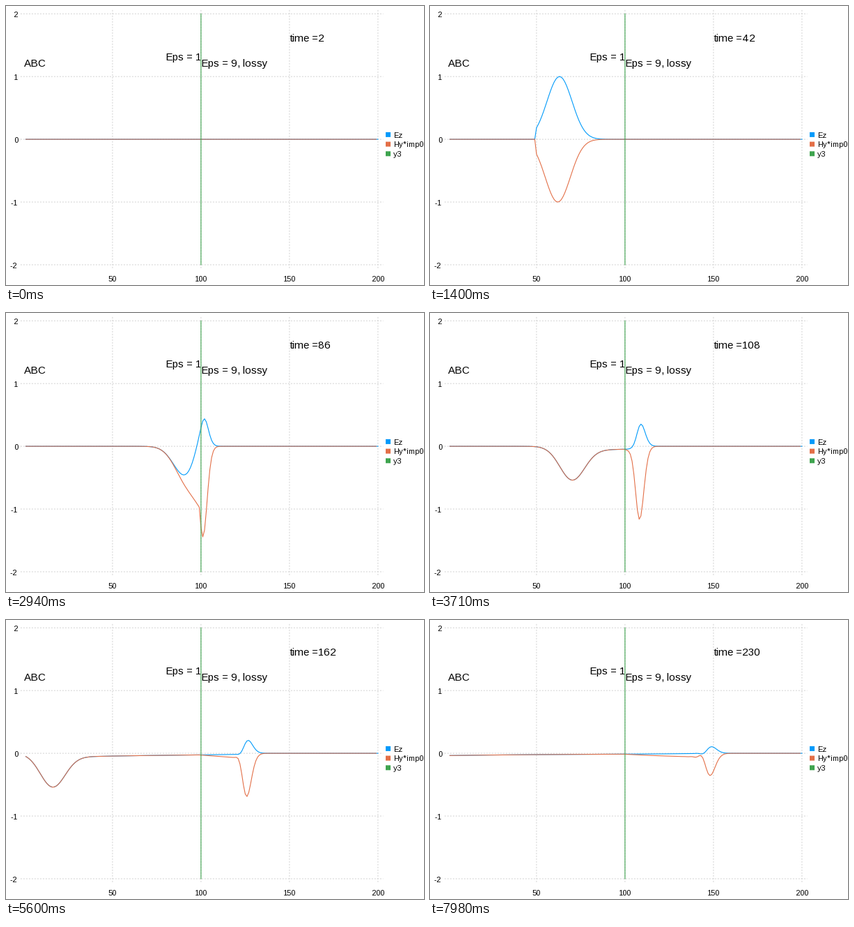
A matplotlib script that plays this animation: 600 by 400 pixels, repeating every 8000 ms.

```python
import numpy as np
import matplotlib.pyplot as plt
from matplotlib.animation import FuncAnimation
from matplotlib.patches import Rectangle

W, H, DPI = 600, 400, 100
PX = 72 / DPI                      # points per pixel
TICK_MS, STEP_MS, LOOP_MS = 20, 70, 8000
BLUE, RED, GREEN, GRID = "#009afa", "#e36f47", "#3ea44e", "#d2d2d2"
SMALL, LARGE = 10.67, 14.67        # font sizes in pixels

SIZE, SOURCE, SURFACE = 200, 50, 100
EPS, LOSS = 9.0, 0.01

# whole-pixel letter advances without kerning
plt.rcParams.update({
    "font.family": "Liberation Sans",
    "text.hinting": "force_autohint",
    "text.hinting_factor": 1,
    "text.kerning_factor": 6,
})


def px(x):
    return 25.9 + 2.54 * x


def py(y):
    return 191.1 - 89.95 * y


def pulse(t):
    return np.exp(-(t - 30) ** 2 / 100)


def simulate(steps):
    """1D field stepping; hy is already scaled by the impedance."""
    node = np.arange(1, SIZE + 1)
    inside = node >= SURFACE
    ca = np.where(inside, (1 - LOSS) / (1 + LOSS), 1.0)
    cb = np.where(inside, 1 / EPS / (1 + LOSS), 1.0)
    ez, hy = np.zeros(SIZE), np.zeros(SIZE - 1)
    history = [(ez.copy(), hy.copy())]
    for q in range(1, steps + 1):
        hy += np.diff(ez)
        hy[SOURCE - 2] -= pulse(q)
        ez[0] = ez[1]
        ez[1:-1] = ca[1:-1] * ez[1:-1] + cb[1:-1] * np.diff(hy)
        ez[SOURCE - 1] += pulse(q + 1)
        history.append((ez.copy(), hy.copy()))
    return history


last_time = 2 + 2 * ((LOOP_MS - 1) // STEP_MS)
fields = simulate(last_time)
xs = px(np.arange(1, SIZE + 1))

fig = plt.figure(figsize=(W / DPI, H / DPI), dpi=DPI, facecolor="white")
ax = fig.add_axes([0, 0, 1, 1])
ax.set_xlim(0, W)
ax.set_ylim(H, 0)
ax.axis("off")


def line(x, y, color, width=1.1, **kw):
    return ax.plot(x, y, color=color, lw=width * PX, snap=False, **kw)[0]


def label(x, y, text, size=SMALL, ha="left"):
    return ax.text(x, y, text, fontsize=size * PX, ha=ha, va="baseline",
                   color="black")


def grid(x, y):
    line(x, y, GRID, 1, dashes=(2, 2), dash_capstyle="butt")


for v in (50, 100, 150, 200):
    grid([px(v)] * 2, [py(2.06), py(-2.06)])
    label(px(v), 395, str(v), ha="center")
for v in range(-2, 3):
    grid([px(-1.985), px(202.985)], [py(v)] * 2)
    label(17, py(v) + 4.6, str(v), ha="right")

ez_line = line(xs, xs, BLUE)
hy_line = line(xs[:-1], xs[:-1], RED)
line([px(SURFACE)] * 2, [py(2), py(-2)], GREEN)

label(26, 87, "ABC", LARGE)
label(229, 78, "Eps = 1", LARGE)
label(280, 87, "Eps = 9, lossy", LARGE)
clock = label(407, 51, "", LARGE)

for i, (name, color) in enumerate((("Ez", BLUE), ("Hy*imp0", RED), ("y3", GREEN))):
    y = 184.4 + 13.7 * i
    ax.add_patch(Rectangle((545, y - 3.5), 7, 7, color=color, lw=0, snap=False))
    label(556, y + 4.4, name)


def update(i):
    step = (i * TICK_MS + TICK_MS // 2) // STEP_MS
    time = 2 + 2 * step
    ez, hy = fields[time]
    ez_line.set_ydata(py(ez))
    hy_line.set_ydata(py(hy))
    clock.set_text(f"time ={time}")
    return ez_line, hy_line, clock


anim = FuncAnimation(fig, update, frames=LOOP_MS // TICK_MS, interval=TICK_MS,
                     repeat=True, repeat_delay=0, init_func=lambda: update(0))
plt.show()
```
